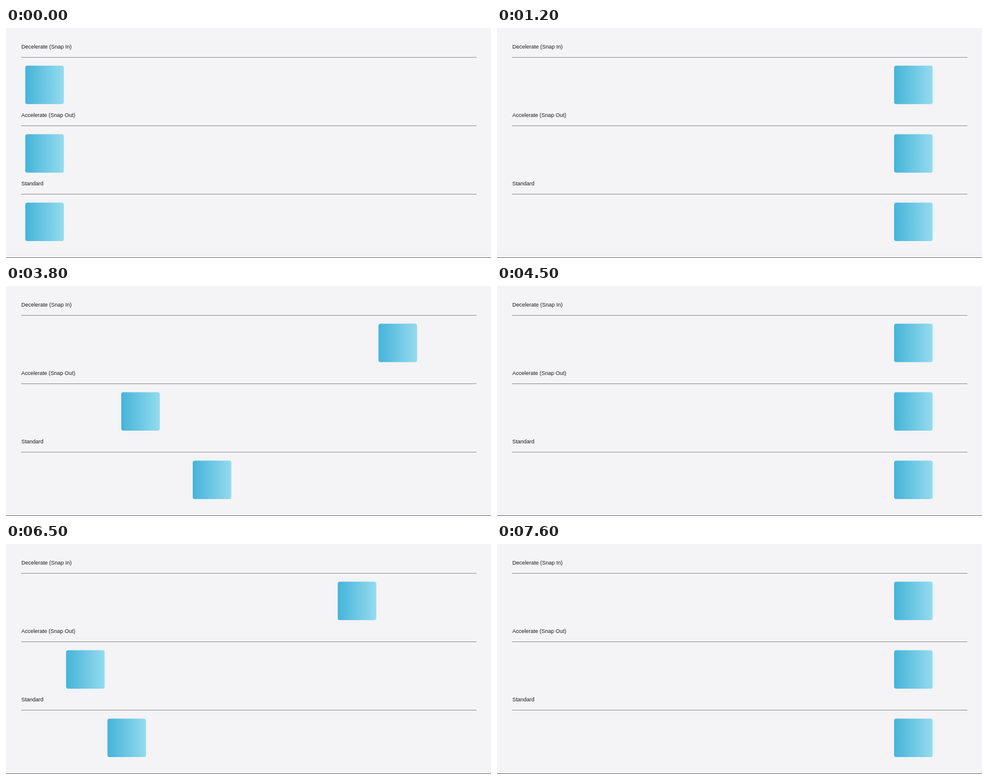
An HTML page that plays this animation: 800 by 380 pixels, repeating every 8 s.

```html
<!DOCTYPE html>
<html lang="en">
<head>
<meta charset="utf-8">
<title>Easing curves</title>
<style>
  html, body { margin: 0; width: 100%; height: 100%; overflow: hidden; background: #f4f3f6; }
  svg { display: block; }
  text { font: 9px "Liberation Sans", Arial, sans-serif; fill: #1c1c1e; }
</style>
</head>
<body>
<svg id="stage" width="800" height="380">
  <defs>
    <linearGradient id="blue">
      <stop offset="0" stop-color="#45b4d9"/>
      <stop offset="1" stop-color="#94dbef"/>
    </linearGradient>
  </defs>
  <rect y="379" width="800" height="1" fill="#77767a"/>
</svg>
<script>
const LOOP = 8000, STEP = 100, DURATION = 1000, LEAD = 10;
const LEFT = 31.8, TRAVEL = 623.2, ROW = 113.1;
const STARTS = [200, 3200, 6100], RESETS = [0, 2300, 5200];

const rows = [
  { label: "Decelerate (Snap In)", curve: [0.024, 0, 0.02, 1] },
  { label: "Accelerate (Snap Out)", curve: [1, 0.09, 0.76, 1] },
  { label: "Standard", curve: [0.457, 0, 0.952, 1] }
];

const stage = document.getElementById("stage");

function add(name, attrs) {
  const el = document.createElementNS("http://www.w3.org/2000/svg", name);
  for (const key in attrs) el.setAttribute(key, attrs[key]);
  return stage.appendChild(el);
}

rows.forEach((row, i) => {
  const y = i * ROW;
  add("text", { x: 25.3, y: Math.round(34 + y) }).textContent = row.label;
  add("rect", { x: 25, y: Math.round(48 + y), width: 751, height: 1, fill: "#949396" });
  row.box = add("rect", { y: 62.3 + y, width: 63.6, height: 63.5, rx: 3.5, fill: "url(#blue)" });
});

const bezier = (a, b, s) => 3 * a * s * (1 - s) ** 2 + 3 * b * s * s * (1 - s) + s ** 3;

function ease([x1, y1, x2, y2], p) {
  if (p <= 0 || p >= 1) return p <= 0 ? 0 : 1;
  let lo = 0, hi = 1;
  for (let i = 0; i < 30; i++) {
    const mid = (lo + hi) / 2;
    if (bezier(x1, x2, mid) < p) lo = mid; else hi = mid;
  }
  return bezier(y1, y2, lo);
}

// The boxes move at ten steps a second.
function draw(now) {
  const t = Math.floor(now % LOOP / STEP) * STEP;
  const cycle = RESETS.filter(r => r <= t).length - 1;
  const start = STARTS[cycle];
  const p = t < start ? 0 : (t - start + LEAD) / DURATION;
  for (const { box, curve } of rows) box.setAttribute("x", LEFT + TRAVEL * ease(curve, p));
}

const begin = performance.now();
function tick() {
  draw(performance.now() - begin);
  requestAnimationFrame(tick);
}
tick();
</script>
</body>
</html>
```
